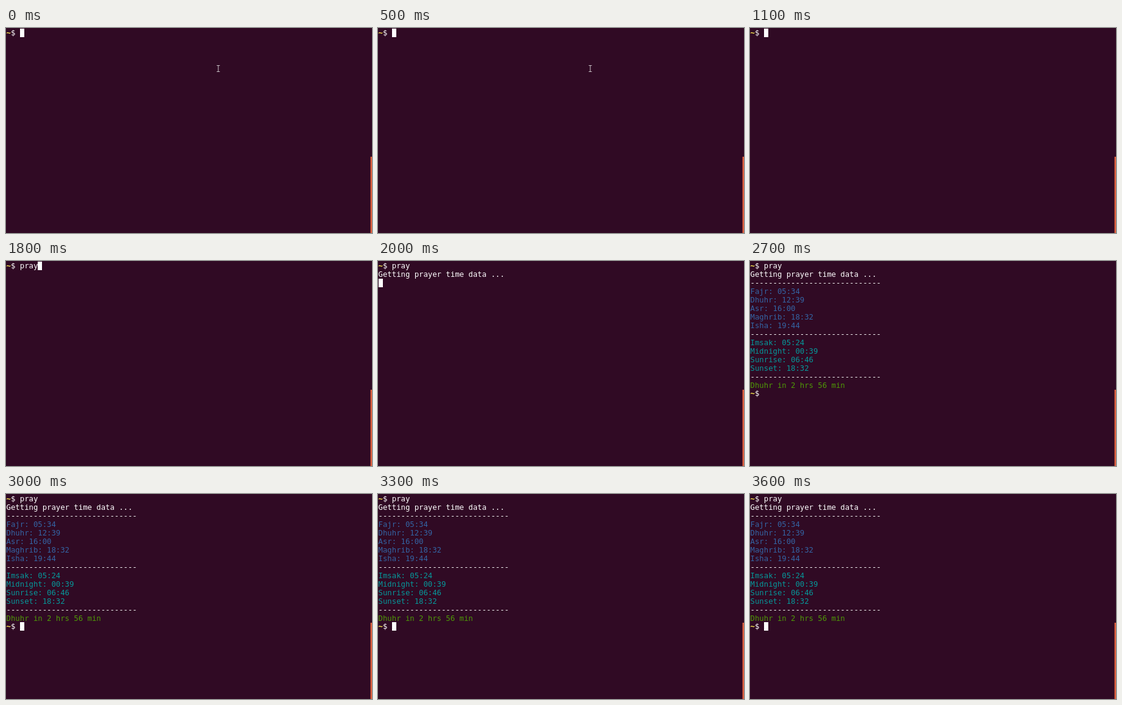
These frames come from a looping animation (600x336 px, 4.6 s). An HTML page with a canvas:

```html
<!DOCTYPE html>
<html lang="en">
<head>
<meta charset="utf-8">
<title>Terminal</title>
<style>
html, body { margin: 0; width: 100%; height: 100%; overflow: hidden; background: #300a24; }
canvas { display: block; }
</style>
</head>
<body>
<canvas id="stage" width="600" height="336"></canvas>
<script>
const ctx = document.getElementById('stage').getContext('2d');
const LOOP = 4600, CELL = 7.39, LINE = 13.95;
const WHITE = '#fff', BLUE = '#3465a4', CYAN = '#06989a', GREEN = '#4e9a06', YELLOW = '#fce94f';
const FONT = '12.27px "Ubuntu Mono", "DejaVu Sans Mono", monospace';
const COMMAND = 'pray';
const KEY_TIMES = [1200, 1400, 1500, 1600];
const RULE = '-'.repeat(29);

const output = [
  [WHITE, RULE],
  [BLUE, 'Fajr: 05:34', 'Dhuhr: 12:39', 'Asr: 16:00', 'Maghrib: 18:32', 'Isha: 19:44'],
  [WHITE, RULE],
  [CYAN, 'Imsak: 05:24', 'Midnight: 00:39', 'Sunrise: 06:46', 'Sunset: 18:32'],
  [WHITE, RULE],
  [GREEN, 'Dhuhr in 2 hrs 56 min']
].flatMap(([color, ...lines]) => lines.map(text => ({ color, text })));

function rect(x, y, w, h, color) {
  ctx.fillStyle = color;
  ctx.fillRect(x, y, w, h);
}

function write(text, row, color = WHITE, col = 0, weight = '') {
  ctx.font = `${weight} ${FONT}`;
  ctx.fillStyle = color;
  ctx.fillText(text, 0.6 + col * CELL, 12.2 + row * LINE);
}

function prompt(row) {
  write('~', row, YELLOW, 0, 'bold');
  write('$', row, WHITE, 1);
}

function cursor(col, row) {
  rect(Math.round(0.6 + col * CELL), Math.round(0.8 + row * LINE), 7, 14, WHITE);
}

function pointer() {
  const color = '#c9c2c7';
  rect(345.5, 61, 5, 1, color);
  rect(347.5, 61, 1, 11, color);
  rect(345.5, 71, 5, 1, color);
}

function draw(t) {
  rect(0, 0, 600, 336, '#300a24');
  rect(597.5, 211, 2.5, 125, '#dd6140');
  if (t < 1100) pointer();

  const typed = KEY_TIMES.filter(time => t >= time).length;
  prompt(0);
  write(COMMAND.slice(0, typed), 0, WHITE, 3);
  if (t >= 2000) write('Getting prayer time data ...', 1);

  if (t >= 2700) {
    output.forEach(({ color, text }, i) => write(text, i + 2, color));
    prompt(15);
  }

  if (t < 1900) cursor(3 + typed, 0);
  else if (t < 2000) cursor(0, 1);
  else if (t < 2400) cursor(0, 2);
  else if (t >= 2800) cursor(3, 15);
}

function tick() {
  draw(performance.now() % LOOP);
  requestAnimationFrame(tick);
}
tick();
</script>
</body>
</html>
```
